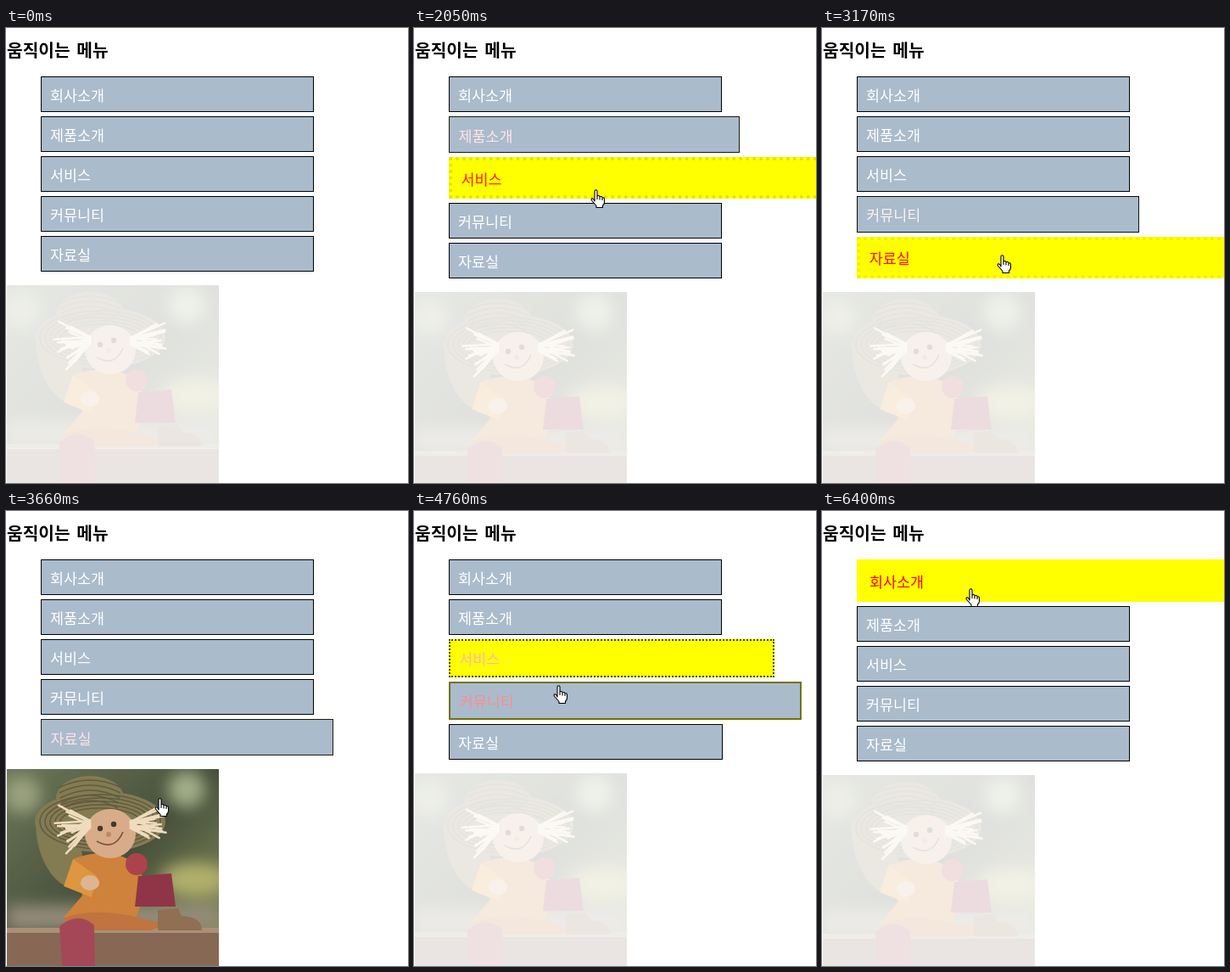
These frames come from a looping animation (474x536 px, 6.74 s). An HTML page:

```html
<!DOCTYPE html>
<html lang="ko">
<head>
<meta charset="utf-8">
<title>움직이는 메뉴</title>
<style>
html, body { margin: 0; width: 100%; height: 100%; overflow: hidden; background: #fff; }
body { position: relative; font-family: "Noto Sans CJK KR", "Noto Sans CJK", sans-serif; }
h3, li, svg { position: absolute; margin: 0; }
h3 { left: 1px; top: 5px; font-size: 20.3px; line-height: 41px; word-spacing: 2px; white-space: nowrap; }
ul { margin: 0; padding: 0; list-style: none; }
li { left: 41px; box-sizing: border-box; font-size: 17.4px; line-height: 21px; white-space: nowrap; }
#photo { left: 1px; }
#hand { left: 0; top: 0; }
</style>
</head>
<body>
<h3>움직이는 메뉴</h3>
<ul><li>회사소개</li><li>제품소개</li><li>서비스</li><li>커뮤니티</li><li>자료실</li></ul>

<svg id="photo" width="250" height="240">
  <defs>
    <linearGradient id="garden" x2="1" y2="1">
      <stop offset="0" stop-color="#5d6846"/><stop offset=".5" stop-color="#343e27"/><stop offset="1" stop-color="#87904f"/>
    </linearGradient>
    <filter id="soft"><feGaussianBlur stdDeviation="9"/></filter>
  </defs>
  <rect width="250" height="240" fill="url(#garden)"/>
  <g filter="url(#soft)">
    <circle cx="18" cy="30" r="22" fill="#8f9870"/>
    <circle cx="212" cy="24" r="22" fill="#98a57a"/>
    <ellipse cx="222" cy="130" rx="40" ry="20" fill="#a9a75c"/>
    <rect y="160" width="250" height="30" fill="#88806c"/>
  </g>
  <rect y="188" width="250" height="52" fill="#7a5843"/>
  <rect y="187" width="250" height="6" fill="#a08468"/>
  <g fill="#766d3f">
    <ellipse cx="98" cy="34" rx="40" ry="26"/>
    <ellipse cx="110" cy="62" rx="77" ry="36"/>
    <ellipse cx="62" cy="90" rx="24" ry="50" transform="rotate(-18 62 90)"/>
  </g>
  <g id="weave" fill="none" stroke="#50492c" stroke-width="1.5"/>
  <path d="M78 106Q114 92 143 106L168 135L151 178L102 188L66 176L89 149Z" fill="#c97526"/>
  <path d="M78 106L67 138L100 151L106 126Z" fill="#d98c2c"/>
  <path d="M66 176Q110 158 188 184L170 190H86Z" fill="#bb642c"/>
  <path d="M62 185Q85 167 103 184L104 240H66Z" fill="#9b3546"/>
  <ellipse cx="98" cy="134" rx="11" ry="9" fill="#dbad88"/>
  <circle cx="153" cy="112" r="13" fill="#a42e3a"/>
  <path d="M155 126L194 123L199 162H151Z" fill="#851f35"/>
  <path d="M178 166L202 164L206 173Q230 174 230 190H178Z" fill="#846040"/>
  <ellipse cx="122" cy="76" rx="30" ry="29" fill="#d4a47d"/>
  <g id="hair" stroke="#eed9b7" stroke-width="2.5" stroke-linecap="round"/>
  <path d="M106 85Q127 97 137 74" fill="none" stroke="#79402d" stroke-width="1.8"/>
  <g fill="#30231c"><circle cx="110" cy="70" r="3.2"/><circle cx="126" cy="65" r="3.2"/></g>
  <circle cx="120" cy="77" r="3" fill="#b97b59"/>
</svg>

<svg id="hand" width="19" height="25">
  <path d="M5 14V2.5Q5 .8 6.5 .8T8 2.5V8Q10.5 6.5 11 9Q13.5 7.6 14 10Q16.5 9 16.5 12V15Q16.5 18 14.5 19V21.5H7V19.5L1.4 13Q.5 11 2.3 10.8Q3.7 11 5 14ZM8 8V12M11 9V12.5M14 10V13"
    fill="#fff" stroke="#000" stroke-width="1.1" stroke-linejoin="round"/>
</svg>

<script>
const LOOP = 6740, DURATION = 600, PHOTO = 5;
const items = [...document.querySelectorAll("li")];
const photo = document.getElementById("photo");
const hand = document.getElementById("hand");

// The pointer goes down through the items to the photo and back up.
const hovers = [540, 1205, 1690, 2230, 2750, 3300, 4080, 4350, 4640, 5100, 5520]
  .map((time, k) => [time, PHOTO - Math.abs(PHOTO - k)]);

// [time, x, y] of the fingertip
const path = [
  [540, 232, 72], [1170, 217, 112], [1860, 215, 190], [2060, 215, 190], [3240, 213, 272],
  [3800, 172, 360], [3990, 172, 360], [4200, 166, 279], [5370, 176, 125], [5800, 176, 91]
];

const lerp = (a, b, k) => a + (b - a) * k;

// cubic-bezier(.25, .1, .25, 1)
function ease(x) {
  if (x >= 1) return 1;
  const curve = (a, b, s) => 3 * a * s * (1 - s) ** 2 + 3 * b * s * s * (1 - s) + s ** 3;
  let low = 0, high = 1;
  for (let i = 0; i < 20; i++) {
    const mid = (low + high) / 2;
    if (curve(.25, .25, mid) < x) low = mid; else high = mid;
  }
  return curve(.1, 1, low);
}

// Hover progress; an interrupted transition returns in proportionally less time.
function progress(id, t) {
  let from = 0, to = 0, start = 0, span = 1;
  const value = time => lerp(from, to, ease((time - start) / span));
  for (const [time, target] of hovers) {
    if (time > t) break;
    const next = +(target === id);
    if (next === to) continue;
    from = value(time);
    to = next;
    start = time;
    span = DURATION * Math.abs(to - from) || 1;
  }
  return value(t);
}

function pointAt(t) {
  const i = path.findIndex(p => p[0] > t);
  const b = path.at(i), a = i < 0 ? b : path[i - 1];
  const k = (t - a[0]) / (b[0] - a[0] || 1);
  return [1, 2].map(n => Math.round(lerp(a[n], b[n], k)));
}

function paintPhoto() {
  let seed = 7, weave = "", hair = "";
  const random = () => (seed = seed * 16807 % 2147483647) / 2147483647;
  for (let k = 1; k < 6; k++) {
    weave += `<ellipse cx="110" cy="62" rx="${77 - 6 * k}" ry="${36 - 4 * k}"/>`;
    weave += `<path d="M${60 + k} ${16 + 6 * k}Q98 ${6 * k - 2} ${136 - k} ${16 + 6 * k}"/>`;
  }
  for (let k = 0; k < 44; k++) {
    const side = k % 2 ? 1 : -1, angle = lerp(-.5, side < 0 ? 1 : .6, random());
    const length = lerp(20, 44, random()), x = 122 + side * 24, y = 60 + 10 * random();
    hair += `<path d="M${x} ${y}l${side * length * Math.cos(angle)} ${length * Math.sin(angle)}"/>`;
  }
  document.getElementById("weave").innerHTML = weave;
  document.getElementById("hair").innerHTML = hair;
}

function draw(t) {
  const active = hovers.reduce((id, [time, next]) => time <= t ? next : id, -1);
  let top = 57.2;
  items.forEach((item, i) => {
    const p = progress(i, t), on = i === active;
    const border = 1 + 4 * p, line = Math.floor(border + 1e-6);
    const tone = Math.round(255 * p), fade = 255 - tone;
    Object.assign(item.style, {
      top: top + "px",
      width: 322 + 208 * p + "px",
      height: 42 + 8 * p + "px",
      padding: 10 + border - line + "px",
      border: `${line}px ${on ? "dotted" : "solid"} rgb(${tone},${tone},0)`,
      background: on ? "#ff0" : "#abc",
      color: `rgb(255,${fade},${fade})`
    });
    top += 47 + 8 * p;
  });
  photo.style.top = Math.round(top + 11.1) + "px";
  photo.style.opacity = lerp(.15, 1, progress(PHOTO, t));

  hand.style.display = t < path[0][0] ? "none" : "block";
  if (t >= path[0][0]) {
    const [x, y] = pointAt(t);
    hand.style.transform = `translate(${x - 7}px,${y}px)`;
  }
}

const begin = performance.now();
function tick() {
  draw((performance.now() - begin) % LOOP);
  requestAnimationFrame(tick);
}
paintPhoto();
tick();
</script>
</body>
</html>
```
